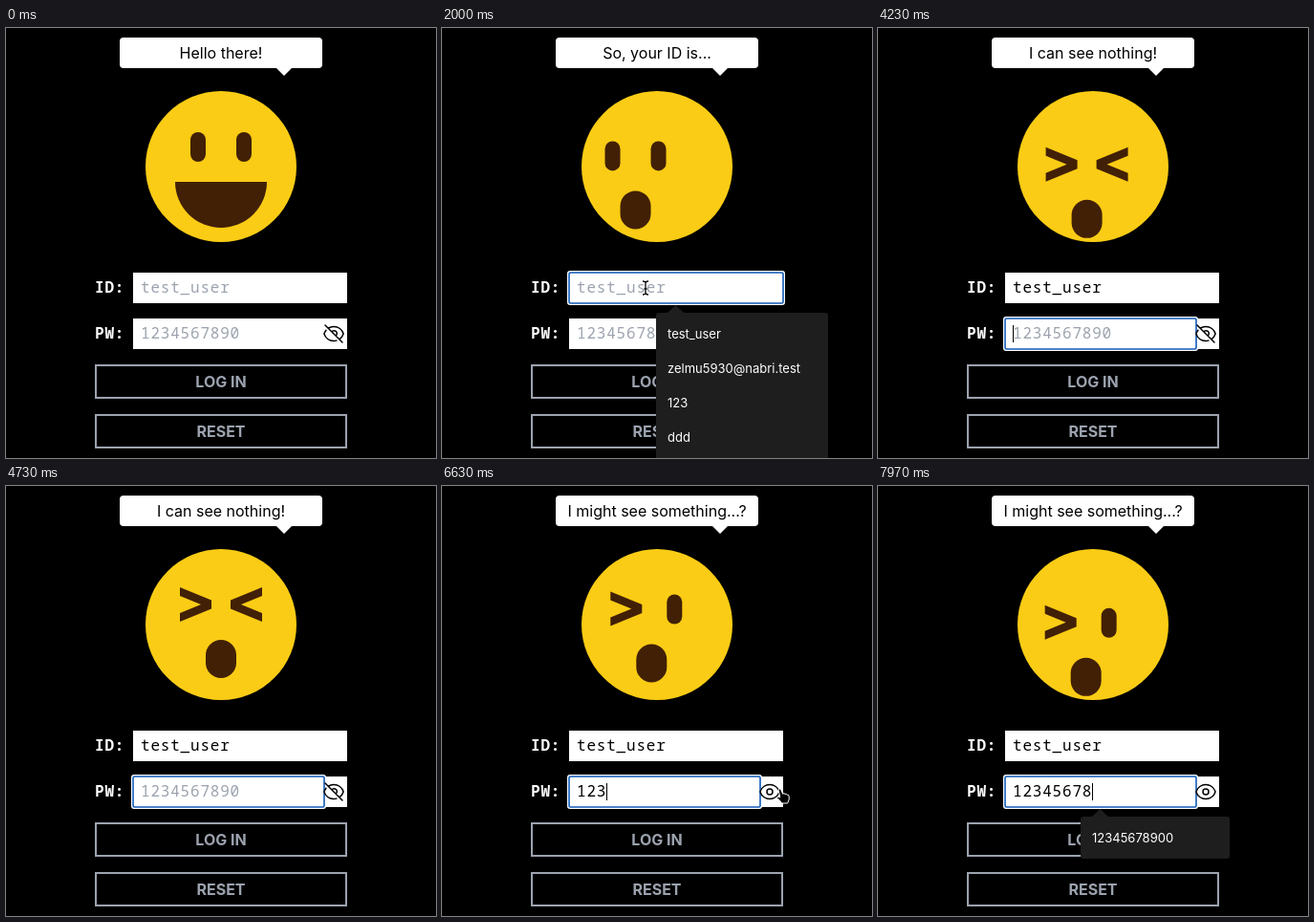
Animation, 450 px wide and 450 px high, one loop 8 s. Source, as an HTML page:

```html
<!DOCTYPE html>
<html lang="en">
<head>
<meta charset="utf-8">
<title>Login face</title>
<style>
  html, body { margin: 0; width: 100%; height: 100%; overflow: hidden; background: #000; }
  svg { display: block; width: 450px; height: 450px; }
  text { font: 16px Inter, sans-serif; white-space: pre; }
  .mid { text-anchor: middle; }
  .mono { font-family: "Noto Sans Mono", monospace; letter-spacing: .8px; }
  .label { font-weight: 700; fill: #fff; }
  .button { font-weight: 700; fill: #9ca3af; }
  .item { font-size: 13px; fill: #fff; }
</style>
</head>
<body>
<svg id="stage" viewBox="0 0 450 450"></svg>
<script>
const LOOP = 8000, MOVE = 500, BLINK = 500;
const GRAY = '#9ca3af', BROWN = '#422006';
const USER = 'test_user', PASS = '12345678';
const FOCUS_ID = 1450, FOCUS_PW = 4220, PRESS_EYE = 6390, SHOW_PW = 6490;
const idKeys = [2370, 2490, 2620, 2730, 3470, 3600, 3730, 3850, 3980];
const pwKeys = [5230, 5350, 5470, 6750, 7080, 7370, 7490, 7600];
const beats = [FOCUS_ID, FOCUS_PW, SHOW_PW, ...idKeys, ...pwKeys];

// Where the face looks while n characters stand before the caret
function gaze(n) {
  const a = (61.4 - 5.67 * n) * Math.PI / 180;
  return [-25.6 * Math.sin(a), 19.7 * Math.cos(a)];
}
const looks = [
  [FOCUS_ID, gaze(0)],
  ...idKeys.map((t, i) => [t, gaze(i + 1)]),
  [FOCUS_PW, [0, 0]],
  [SHOW_PW, gaze(3)],
  ...pwKeys.map((t, i) => [t, gaze(i + 1)]).filter(l => l[0] > SHOW_PW)
];

const clamp = v => Math.max(0, Math.min(1, v));
const count = (keys, t) => keys.filter(k => k <= t).length;

// cubic-bezier(.4, 0, .2, 1)
function ease(x) {
  if (x <= 0 || x >= 1) return clamp(x);
  let lo = 0, hi = 1, s;
  for (let i = 0; i < 20; i++) {
    s = (lo + hi) / 2;
    const bx = 1.2 * s * (1 - s) ** 2 + .6 * s * s * (1 - s) + s ** 3;
    if (bx < x) lo = s; else hi = s;
  }
  return s * s * (3 - 2 * s);
}

// Each new look starts from wherever the previous one had got to
function faceOffset(t) {
  let from = [0, 0], to = [0, 0], start = 0;
  const at = time => {
    const k = ease((time - start) / MOVE);
    return from.map((v, i) => v + (to[i] - v) * k);
  };
  for (const [time, target] of looks) {
    if (time > t) break;
    from = at(time);
    to = target;
    start = time;
  }
  return at(t);
}

const rect = (x, y, w, h, r, fill, extra = '') =>
  `<rect x="${x}" y="${y}" width="${w}" height="${h}" rx="${r}" fill="${fill}" ${extra}/>`;
const path = (d, fill, extra = '') => `<path d="${d}" fill="${fill}" ${extra}/>`;
const text = (x, y, cls, str, extra = '') => `<text x="${x}" y="${y}" class="${cls}" ${extra}>${str}</text>`;

function bubble(str) {
  return rect(119, 10, 212, 32, 4, '#fff') + path('M283 42h16l-8 8z', '#fff') + text(225, 32, 'mid', str);
}

function face(mood, [x, y]) {
  const shut = 'M182 106L215 119.5V128.5L182 142V133L204 124L182 115z';
  const open = x => rect(x, 109, 16, 31, 8, BROWN);
  const left = mood == 'shut' || mood == 'wink' ? path(shut, BROWN) : open(193);
  const right = mood == 'shut' ? path(shut, BROWN, 'transform="matrix(-1 0 0 1 450 0)"') : open(241);
  const mouth = mood == 'smile' ? path('M177 161h96a48 48 0 0 1-96 0z', BROWN) : rect(209, 161, 32, 40, 16, BROWN);
  return `<circle cx="225" cy="145" r="79" fill="#facc15"/>
    <g transform="translate(${x} ${y})">${left}${right}${mouth}</g>`;
}

function ring(y, w) {
  return rect(131, y - 2, w + 4, 36, 3, '#fff') +
    rect(133, y, w, 32, 1.5, '#fff', 'stroke="#105ab8" stroke-width="1.6"');
}

function field(y, label, value, hint, focused, caretOn, w, dots) {
  let out = text(93, y + 21, 'mono label', label) + rect(133, y, 224, 32, 0, '#fff');
  if (focused) out += ring(y, w);
  if (!value) out += text(141, y + 21, 'mono', hint, `fill="${GRAY}"`);
  else if (!dots) out += text(141, y + 21, 'mono', value);
  else for (let i = 0; i < value.length; i++) out += `<circle cx="${145.5 + 11.2 * i}" cy="${y + 16}" r="2.5"/>`;
  if (focused && caretOn) {
    const step = dots ? 11.2 : 10.4;
    out += rect(Math.round(141 + step * value.length), y + 7, 1, 18, 0, '#000');
  }
  return out;
}

function button(y, str) {
  return rect(94, y + 1, 262, 34, 0, 'none', `stroke="${GRAY}" stroke-width="2"`) +
    text(225, y + 24, 'mid button', str);
}

function eyeIcon(shown) {
  const d = shown
    ? 'M2 12.3a1 1 0 0 1 0-.6C3.4 7.5 7.4 4.5 12 4.5s8.6 3 10 7.2a1 1 0 0 1 0 .6c-1.4 4.2-5.4 7.2-10 7.2s-8.6-3-10-7.2zM15 12a3 3 0 1 1-6 0a3 3 0 0 1 6 0z'
    : 'M4 8.2A10.5 10.5 0 0 0 1.9 12C3.2 16.3 7.2 19.5 12 19.5q1.5 0 2.9-.4M6.2 6.2A10.5 10.5 0 0 1 12 4.5c4.8 0 8.8 3.2 10.1 7.5a10.5 10.5 0 0 1-4.3 5.8M3 3l18 18M14.1 14.1a3 3 0 1 0-4.2-4.2';
  return path(d, 'none', `transform="translate(331 308)" stroke="#000" stroke-width="1.5"
    stroke-linecap="round" stroke-linejoin="round"`);
}

function dropdown(x, y, w, items) {
  if (!items.length) return '';
  return rect(x, y, w, 8 + 36 * items.length, 3, '#1e1e1e') +
    path(`M${x + 12} ${y}l8.5-8l8.5 8z`, '#1e1e1e') +
    items.map((s, i) => text(x + 12, y + 27 + 36 * i, 'item', s)).join('');
}

function cursor(t) {
  const first = t < 3000;
  if (t < 770 || t >= idKeys[0] && t < 5700 || t >= pwKeys[3]) return '';
  const [x0, y0, x1, y1, start, span] = first ? [446, 292, 213, 272, 770, 430] : [424, 322, 352, 317, 5700, 260];
  const k = 1 - (1 - clamp((t - start) / span)) ** 2;
  const x = x0 + (x1 - x0) * k, y = y0 + (y1 - y0) * k;
  const outline = 'stroke="#fff" stroke-width="1" stroke-linejoin="round"';
  let shape;
  if (x > 357) shape = path('M0 0V14.5L3.4 11.3L5.7 16.4L8 15.4L5.8 10.5H10.4z', '#000', outline);
  else if (first) shape = path('M-3-7Q0-7 0-5Q0-7 3-7M0-5V5M-3 7Q0 7 0 5Q0 7 3 7M-1.5 1h3', 'none', 'stroke="#000" stroke-width="1.3"');
  else shape = path('M0 1Q1.5-1 3 1L4.6 5.2Q6-.2+4.6 5.2Q6.2 4 7 5.4Q8.6 4.6 9.2 6.2Q11 5.6 11.2 8V11L9.6 15H3.6Q1.5 11.5-1.4 9.6Q-1 7.4 1.8 8.6z'.replace('Q6-.2+4.6 5.2', ''), '#000', outline);
  return `<g transform="translate(${x} ${y})">${shape}</g>`;
}

function draw(t) {
  const focus = t < FOCUS_ID ? '' : t < FOCUS_PW ? 'id' : t >= PRESS_EYE && t < SHOW_PW ? '' : 'pw';
  const shown = t >= SHOW_PW;
  const user = USER.slice(0, count(idKeys, t));
  const pass = PASS.slice(0, count(pwKeys, t));
  const last = Math.max(0, ...beats.filter(b => b <= t));
  const caretOn = Math.floor((t - last) / BLINK) % 2 == 0;
  const [mood, words] = !focus ? ['smile', 'Hello there!']
    : focus == 'id' ? ['awe', 'So, your ID is...']
    : shown ? ['wink', 'I might see something...?'] : ['shut', 'I can see nothing!'];

  let menu = '';
  if (focus == 'id') {
    const items = user ? ['test_user', 'test_use'].filter(s => s.startsWith(user))
      : ['test_user', 'zelmu5930@nabri.test', '123', 'ddd', 'test_use'];
    menu = dropdown(224, 298, user ? 156 : 180, items);
  } else if (shown && pass.length > 3) {
    menu = dropdown(212, 346, 156, ['12345678900']);
  }

  return rect(0, 0, 450, 450, 0, '#000') + bubble(words) + face(mood, faceOffset(t)) +
    field(256, 'ID:', user, 'test_user', focus == 'id', caretOn, 224, false) +
    field(304, 'PW:', pass, '1234567890', focus == 'pw', caretOn, 200, !shown) +
    eyeIcon(shown) + button(352, 'LOG IN') + button(404, 'RESET') + menu + cursor(t);
}

const stage = document.getElementById('stage');
function tick() {
  stage.innerHTML = draw(performance.now() % LOOP);
  requestAnimationFrame(tick);
}
tick();
</script>
</body>
</html>
```
